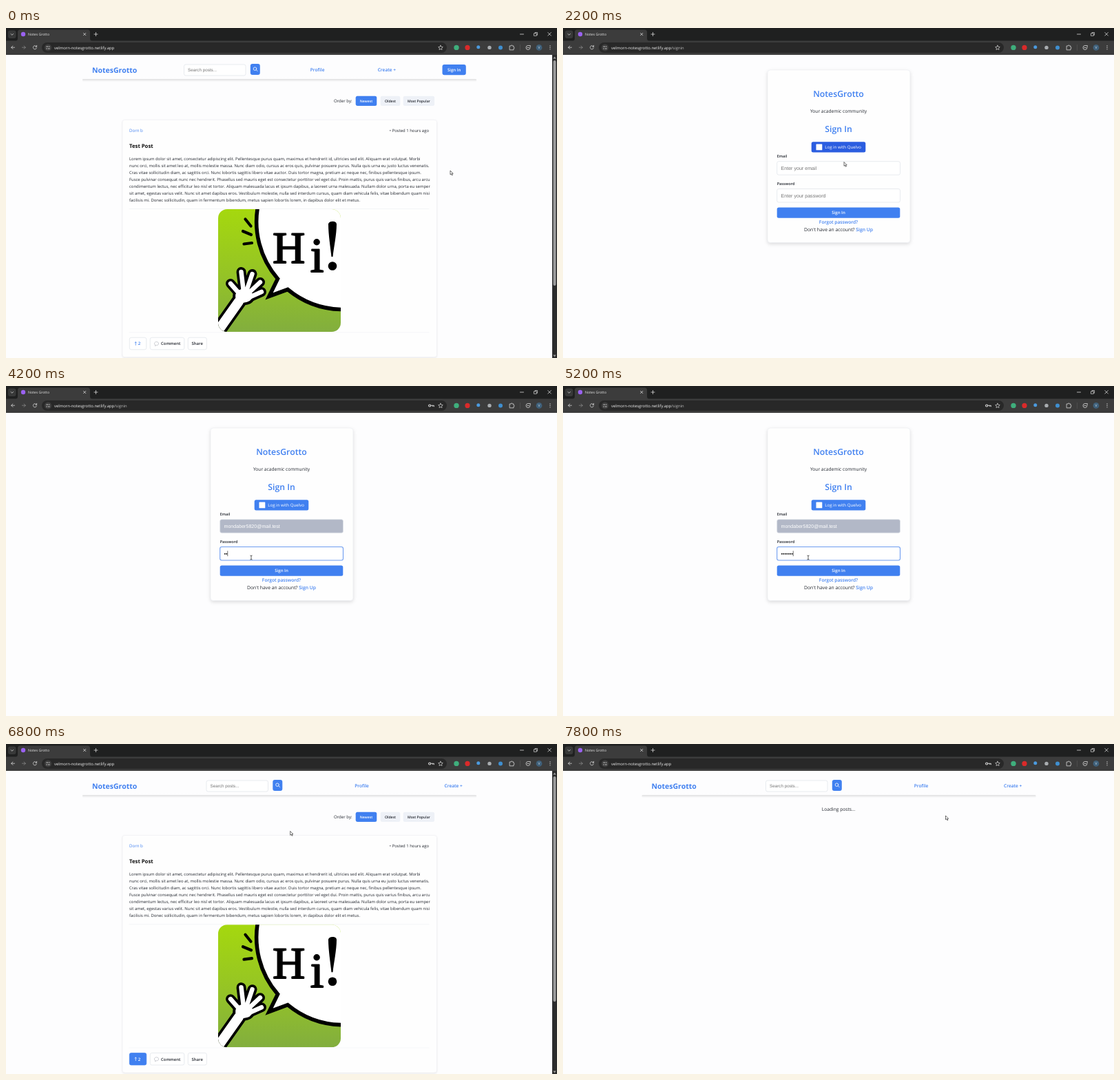
An HTML page that plays this animation: 800x479 px, repeating every 8 s.

```html
<!DOCTYPE html>
<html lang="en">
<head>
<meta charset="utf-8">
<title>Notes Grotto</title>
<style>
  html, body { margin: 0; width: 100%; height: 100%; overflow: hidden; background: #fdfdfe; }
  svg { display: block; width: 100%; height: 100%; }
  text { font-family: "Open Sans", "Noto Sans", sans-serif; text-rendering: geometricPrecision; white-space: pre; }
  .b { font-weight: 600; }
  .bb { font-weight: 700; }
  .mid { text-anchor: middle; }
  .end { text-anchor: end; }
  .field { font-family: "Liberation Sans", Arial, sans-serif; }
  .serif { font-family: "Liberation Serif", serif; stroke: #000; stroke-width: 2; stroke-linejoin: round; }
  .line { fill: none; stroke-linecap: round; stroke-linejoin: round; }
  .card { filter: drop-shadow(0 1px 1px rgba(0, 0, 0, .08)); }
  .panel { filter: drop-shadow(0 2.5px 2.5px rgba(0, 0, 0, .13)); }
</style>
</head>
<body>
<svg id="stage" viewBox="0 0 800 479" preserveAspectRatio="none"></svg>
<script>
const BLUE = '#4080f0', DARK_BLUE = '#2b5de0', INK = '#22262e', HINT = '#757575', EDGE = '#dfe2e8';
const STEP = 200, LOOP = 8000;

const text = (x, y, size, str, fill = INK, cls = '', id = '') =>
  `<text x="${x}" y="${y}" font-size="${size}" fill="${fill}" class="${cls}" id="${id}">${str}</text>`;
const rect = (x, y, w, h, r, fill, rest = '') =>
  `<rect x="${x}" y="${y}" width="${w}" height="${h}" rx="${r}" fill="${fill}" ${rest}/>`;
const line = (d, color, width = 1, rest = '') =>
  `<path class="line" d="${d}" stroke="${color}" stroke-width="${width}" ${rest}/>`;
const dot = (x, y, r, fill) => `<circle cx="${x}" cy="${y}" r="${r}" fill="${fill}"/>`;
const group = (id, ...parts) => `<g id="${id}">${parts.join('')}</g>`;
const outlined = (x, y, w, h, r, rest = '') =>
  rect(x, y, w, h, r, '#fff', `stroke="${EDGE}" stroke-width=".7" ${rest}`);

const nav = (search, profile, create) =>
  rect(111, 74, 572, 4, 1, 'url(#shade)') +
  text(125, 64.7, 10.5, 'NotesGrotto', BLUE, 'bb') +
  outlined(search, 53, 89.5, 16, 2.5) +
  text(search + 5.5, 63.2, 6.3, 'Search posts...', HINT, 'field') +
  rect(search + 96.3, 52, 14, 16, 3, BLUE) +
  line(`M${search + 104.8} 60.8l1.8 1.8M${search + 105.3} 59.2a2.3 2.3 0 1 0-4.6 0a2.3 2.3 0 1 0 4.6 0`, '#fff', .8) +
  text(profile, 63.2, 6.6, 'Profile', BLUE, 'b') +
  text(create, 63.2, 6.6, 'Create +', BLUE, 'b');

const lorem = [
  'Lorem ipsum dolor sit amet, consectetur adipiscing elit. Pellentesque purus quam, maximus et hendrerit id, ultricies sed elit. Aliquam erat volutpat. Morbi',
  'nunc orci, mollis sit amet leo at, mollis molestie massa. Nunc diam odio, cursus ac eros quis, pulvinar posuere purus. Nulla quis urna eu justo luctus venenatis.',
  'Cras vitae sollicitudin diam, ac sagittis orci. Nunc lobortis sagittis libero vitae auctor. Duis tortor magna, pretium ac neque nec, finibus pellentesque ipsum.',
  'Fusce pulvinar consequat nunc nec hendrerit. Phasellus sed mauris eget est consectetur porttitor vel eget dui. Proin mattis, purus quis varius finibus, arcu arcu',
  'condimentum lectus, nec efficitur leo nisl et tortor. Aliquam malesuada lacus et ipsum dapibus, a laoreet urna malesuada. Nullam dolor urna, porta eu semper',
  'sit amet, egestas varius velit. Nunc sit amet dapibus eros. Vestibulum molestie, nulla sed interdum cursus, quam diam vehicula felis, vitae bibendum quam nisi',
  'facilisis mi. Donec sollicitudin, quam in fermentum bibendum, metus sapien lobortis lorem, in dapibus dolor elit et metus.'
];

const hand = (color, grow) =>
  line('M302 448L338 397', color, 14 + grow) +
  line('M343 389L348 388', color, 20 + grow) +
  line('M340 387L326 371M345 383L341.500 354M349 382L357.500 357M353 384L369 369M353 391L371 383', color, 6.5 + grow);

const picture =
  '<g clip-path="url(#round)">' +
  rect(308, 263, 178, 178, 0, 'url(#green)') +
  `<path d="M366.400 255A126.500 126.500 0 0 0 394.500 364L382 389.500L409 379.500A126.500 126.500 0 0 0 490 408.500V255Z"
    fill="#fff" stroke="#000" stroke-width="5.6"/>` +
  line('M347.500 277.500L355.500 287.500M344 295L356 300M345.500 313.500L357 312', '#000', 4.2) +
  hand('#000', 7.5) + hand('#fff', 0) +
  text(387.3, 341, 65, 'H', '#000', 'serif') +
  text(441.8, 353.5, 71, 'i', '#000', 'serif') +
  '<path d="M468 285C468 280 480 279 480 285C480 300 476 318 474.500 332H472.500C471 318 468 300 468 285Z"/>' +
  dot(474, 345.5, 6.3, '#000') + '</g>';

const sortButton = (x, w, label, fill, ink) =>
  rect(x, 98.7, w, 14.2, 2.5, fill) + text(x + w / 2, 108, 5.1, label, ink, 'b mid');

const feed = group('feed',
  text(476, 107.9, 6.1, 'Order by:'),
  sortButton(507.7, 30.6, 'Newest', BLUE, '#fff'),
  sortButton(543.7, 28.6, 'Oldest', '#eef1f7', INK),
  sortButton(576.7, 45.4, 'Most Popular', '#eef1f7', INK),
  '<g id="post">',
  rect(169, 133.3, 456.5, 344.5, 3.5, '#fefefe', 'stroke="#eff0f4" stroke-width=".7" class="card"'),
  text(179, 151.2, 6.15, 'Dorn b', BLUE),
  text(614, 151.2, 5.95, '• Posted 1 hours ago', INK, 'end'),
  text(179, 173.6, 7.75, 'Test Post', '#111', 'bb'),
  ...lorem.map((row, i) => text(179, 192.3 + i * 10, 5.93, row)),
  line('M179 262.500H614M179 441.800H614', '#f1f2f5', .7),
  picture,
  group('vote', outlined(179.3, 449.3, 24.5, 17.5, 2.5, 'id="voteBox"'),
    line('M188.300 460.300V455.800M187.200 456.900L188.300 455.700L189.400 456.900', 'currentColor', .7),
    text(191.8, 460.4, 6.2, '2', 'currentColor', 'b')),
  outlined(209.3, 449.3, 49.5, 17.5, 2.5),
  line('M216.800 460.300C214.200 459 215.300 455.500 218.500 455.500C222.500 455.500 222.800 460.600 218.500 460.600L216.500 461.200Z', '#a9adb6', .6),
  text(225, 460.4, 5.95, 'Comment', INK, 'b'),
  outlined(264.3, 449.3, 27, 17.5, 2.5), text(269.5, 460.4, 5.95, 'Share', INK, 'b'),
  '</g>',
  rect(793, 39, 7, 440, 0, '#2c2c2c'), rect(794.5, 47, 4, 327, 2, '#9d9d9d'),
  '<path d="M794.300 44.500h4.400l-2.200-3zM794.300 474.500h4.400l-2.200 3z" fill="#9d9d9d"/>');

const login = group('login',
  rect(297, 61, 207, 250.5, 4, '#fefefe', 'stroke="#eceef2" stroke-width=".7" class="panel"'),
  text(400, 99.8, 12.3, 'NotesGrotto', BLUE, 'b mid'),
  text(400, 123.2, 6.67, 'Your academic community', INK, 'mid'),
  text(400, 150.5, 12.3, 'Sign In', BLUE, 'b mid'),
  rect(360.7, 165.3, 78.6, 15.3, 2.5, BLUE, 'id="partner"'),
  rect(367.5, 168.5, 8.8, 8.8, .5, '#fff'),
  text(380.3, 175.2, 6.1, 'Log in with Quelvo', '#fff'),
  text(310.7, 187.9, 5.55, 'Email', INK, 'b'),
  outlined(310.7, 193.7, 178.8, 19.5, 2.5, 'id="emailBox"'),
  text(316.5, 205.9, 7.1, '', HINT, 'field', 'email'),
  text(310.7, 227.6, 5.55, 'Password', INK, 'b'),
  outlined(310.7, 233.5, 178.8, 19.5, 2.5, 'id="passBox"'),
  text(316.5, 245.7, 7.1, '', HINT, 'field', 'pass'),
  line('M0 0V7', '#111', .6, 'id="caret"'),
  rect(310.7, 260.5, 178.6, 15.2, 2.5, BLUE),
  text(400, 270.4, 6.1, 'Sign In', '#fff', 'b mid'),
  text(400, 284.2, 6.65, 'Forgot password?', BLUE, 'b mid'),
  text(400, 294.7, 6.8, `Don't have an account? <tspan class="b" fill="${BLUE}">Sign Up</tspan>`, INK, 'mid'));

const PALE = '#d8d8d8';
const browser = group('browser',
  rect(0, 0, 800, 39, 0, '#1f2020'),
  rect(3, 3.5, 11.5, 11.5, 3, '#383939'), line('M7 8.500l1.800 1.700l1.800-1.700', PALE, .8),
  '<path d="M0 18.500H14Q17 18.500 17 15V6Q17 2.500 20.500 2.500H118.500Q122 2.500 122 6V15Q122 18.500 125 18.500H800V39H0Z" fill="#3c3c3c"/>',
  dot(25, 9, 3.2, '#9a62f0'),
  text(32, 11, 5.15, 'Notes Grotto', '#e6e6e6'),
  line('M112.500 7.300l3.400 3.400m0-3.400l-3.400 3.400M128 9h5m-2.500-2.500v5M746.500 9h5M786.800 6.500l4.600 4.600m0-4.600l-4.600 4.600', PALE, .8),
  line('M766.800 7.800h3.500v3.500h-3.500zM768 7.500v-1h3.600v3.700h-1', PALE, .7),
  line('M12.500 28.200H7.700m2.200-2.200l-2.200 2.200l2.200 2.200', PALE, .8),
  line('M23.500 28.200h4.800m-2.200-2.200l2.200 2.200l-2.200 2.200', '#8b8b8b', .8),
  line('M44.300 27A2.600 2.600 0 1 0 44.500 29M44.600 25.300v1.900h-1.900', PALE, .8),
  rect(52, 21, 588, 15, 7.5, '#282828'),
  dot(61, 28.4, 5.2, '#3d3d3d'),
  line('M58.800 27h2M62.300 27h.8M58.800 30h.8M61.300 30h2', PALE, .9),
  text(70, 30.6, 5.9, 'velmorn-notesgrotto.netlify.app<tspan id="path" fill="#b9b9b9"></tspan>', '#ededed'),
  group('key', dot(615.2, 28.5, 2.1, PALE), dot(615.2, 28.5, 1, '#282828'), line('M617.400 28.300h4v1.500m-1.700-1.500v1.300', PALE, .9)),
  line('M631 25.200l1 2.100l2.300.3l-1.700 1.600l.4 2.300l-2-1.100l-2 1.100l.4-2.300l-1.700-1.600l2.300-.3z', PALE, .7),
  dot(654, 28.4, 3.7, '#3fae7c'), dot(670, 28.4, 3.6, '#d92a2a'), dot(685.8, 27.8, 2.5, '#4b9be0'),
  dot(702, 28.4, 2.7, '#a9adb0'), dot(718, 28.4, 3, '#3f8fd0'),
  line('M731.500 26h1.800a1 1 0 0 1 2 0h1.700v1.900a1 1 0 0 1 0 2v1.900h-5.500z', PALE, .8),
  line('M746.500 24.500v8', '#5a5a5a', .6),
  line('M761 28.500a3 3 0 1 1-3-3h3zM756.800 28.500h2.400', PALE, .8),
  dot(774, 28.4, 4.4, '#3f607a'), text(774, 30.3, 5, 'V', '#d5e5f2', 'mid'),
  dot(790, 26, .65, PALE), dot(790, 28.4, .65, PALE), dot(790, 30.8, .65, PALE));

const pointer = group('cursor',
  group('arrow', '<path d="M0 0V5.800L1.400 4.600L2.400 6.800L3.400 6.400L2.500 4.300H4.200Z" fill="#fff" stroke="#111" stroke-width=".6"/>'),
  group('hand', '<path d="M-.6 0Q0-.7.600 0V2.400L3 3Q3.700 3.300 3.500 4.300L2.900 6.600H-.2L-2.300 4.200Q-2.400 3.200-1.400 3.400L-.6 4.100Z" fill="#fff" stroke="#111" stroke-width=".6"/>'),
  group('beam', line('M-1.200-3Q0-3 0-2.300Q0-3 1.200-3M0-2.500V2.500M-1.200 3Q0 3 0 2.300Q0 3 1.200 3', '#222', .7)));

document.getElementById('stage').innerHTML =
  `<defs>
    <linearGradient id="green" x2="0" y2="1"><stop stop-color="#a5d80e"/><stop offset=".5" stop-color="#96c524"/><stop offset="1" stop-color="#82ae3e"/></linearGradient>
    <linearGradient id="shade" x2="0" y2="1"><stop stop-color="#000" stop-opacity=".12"/><stop offset="1" stop-color="#000" stop-opacity="0"/></linearGradient>
    <clipPath id="round">${rect(308, 263, 178, 178, 13, '#000')}</clipPath>
  </defs>` +
  rect(0, 0, 800, 479, 0, '#fdfdfe') +
  group('guest', nav(258.5, 441.8, 539.7),
    group('ring', rect(632.3, 51.8, 36.7, 17.7, 4, '#26345c'), rect(633, 52.5, 35.3, 16.3, 3.5, '#fff')),
    rect(633.5, 53, 34.3, 15.3, 3, BLUE, 'id="signIn"'),
    text(650.7, 63, 6.1, 'Sign In', '#fff', 'b mid')) +
  group('member', nav(291, 506.2, 636.5)) +
  feed + text(400, 97.2, 6.67, 'Loading posts...', INK, 'mid', 'loading') +
  login + browser + pointer;

const $ = id => document.getElementById(id);
const show = (id, on) => { $(id).style.display = on ? '' : 'none'; };
const set = (id, attrs) => Object.entries(attrs).forEach(([k, v]) => $(id).setAttribute(k, v));

// time, x, y, shape
const moves = [
  [0, 645, 207, 'arrow'], [1000, 652, 63, 'hand'], [1200, 652, 63, 'hand'], [1400, 645, 70, 'arrow'],
  [2000, 404, 175, 'hand'], [2200, 408, 194.5, 'arrow'], [2400, 396, 204, 'beam'], [2800, 386, 222, 'arrow'],
  [3200, 380, 244, 'arrow'], [3400, 364, 247, 'beam'], [3800, 356, 249, 'beam'], [5800, 356, 249, 'beam'],
  [6200, 368, 222, 'arrow'], [6800, 412.7, 126.5, 'arrow'], [7400, 555.5, 104, 'hand'], [7600, 555.5, 104, 'arrow'],
  [LOOP, 555.5, 104, 'arrow']
];

function moveCursor(t) {
  const i = moves.findIndex(m => m[0] > t);
  const [t0, x0, y0, shape] = moves[i - 1], [t1, x1, y1] = moves[i];
  const p = (t - t0) / (t1 - t0), e = p * p * (3 - 2 * p);
  set('cursor', { transform: `translate(${x0 + (x1 - x0) * e} ${y0 + (y1 - y0) * e})` });
  ['arrow', 'hand', 'beam'].forEach(id => show(id, id === shape));
}

function drawForm(t) {
  const filled = t >= 3000, onEmail = t >= 2600 && t < 3400, onPass = t >= 3400;
  const typed = Math.max(0, Math.min(9, (t - 3800) / STEP));
  const edge = on => ({ stroke: on ? '#6d9cf0' : EDGE, 'stroke-width': on ? 1.1 : .7 });
  set('partner', { fill: t >= 1800 && t <= 2200 ? DARK_BLUE : BLUE });
  set('emailBox', { ...edge(onEmail), fill: filled ? '#b2b8c7' : '#fff' });
  set('passBox', edge(onPass));
  set('email', { fill: filled ? '#fff' : HINT });
  set('pass', { fill: typed ? '#111' : HINT });
  $('email').textContent = filled ? 'mondaber5820@mail.test' : 'Enter your email';
  $('pass').textContent = typed ? '•'.repeat(typed) : 'Enter your password';
  show('caret', onEmail || onPass);
  const x = onPass ? 316.8 + typed * 2.49 : filled ? 399 : 316.5;
  set('caret', { transform: `translate(${x} ${onPass ? 239.7 : 200})`, stroke: onEmail && filled ? '#fff' : '#111' });
}

function draw(t) {
  const guest = t < 1400, member = t >= 6200;
  const loading = t >= 7600 || (member && t < 6400);
  show('guest', guest);
  show('member', member);
  show('login', !guest && !member);
  show('feed', guest || (member && !loading));
  show('loading', loading);
  show('key', t >= 4000);
  show('ring', t >= 1200);
  $('path').textContent = guest || member ? '' : '/signin';
  set('signIn', { fill: t >= 1000 ? DARK_BLUE : BLUE });
  set('member', { transform: `translate(${loading ? 3.5 : 0} 0)` });
  set('post', { transform: `translate(0 ${member ? -.8 : 0})` });
  set('voteBox', { fill: member ? BLUE : '#fff', stroke: member ? BLUE : EDGE });
  $('vote').style.color = member ? '#fff' : BLUE;
  drawForm(t);
  moveCursor(t);
}

function tick() {
  const t = performance.now() % LOOP;
  draw(Math.floor(t / STEP) * STEP);
  requestAnimationFrame(tick);
}
tick();
</script>
</body>
</html>
```
